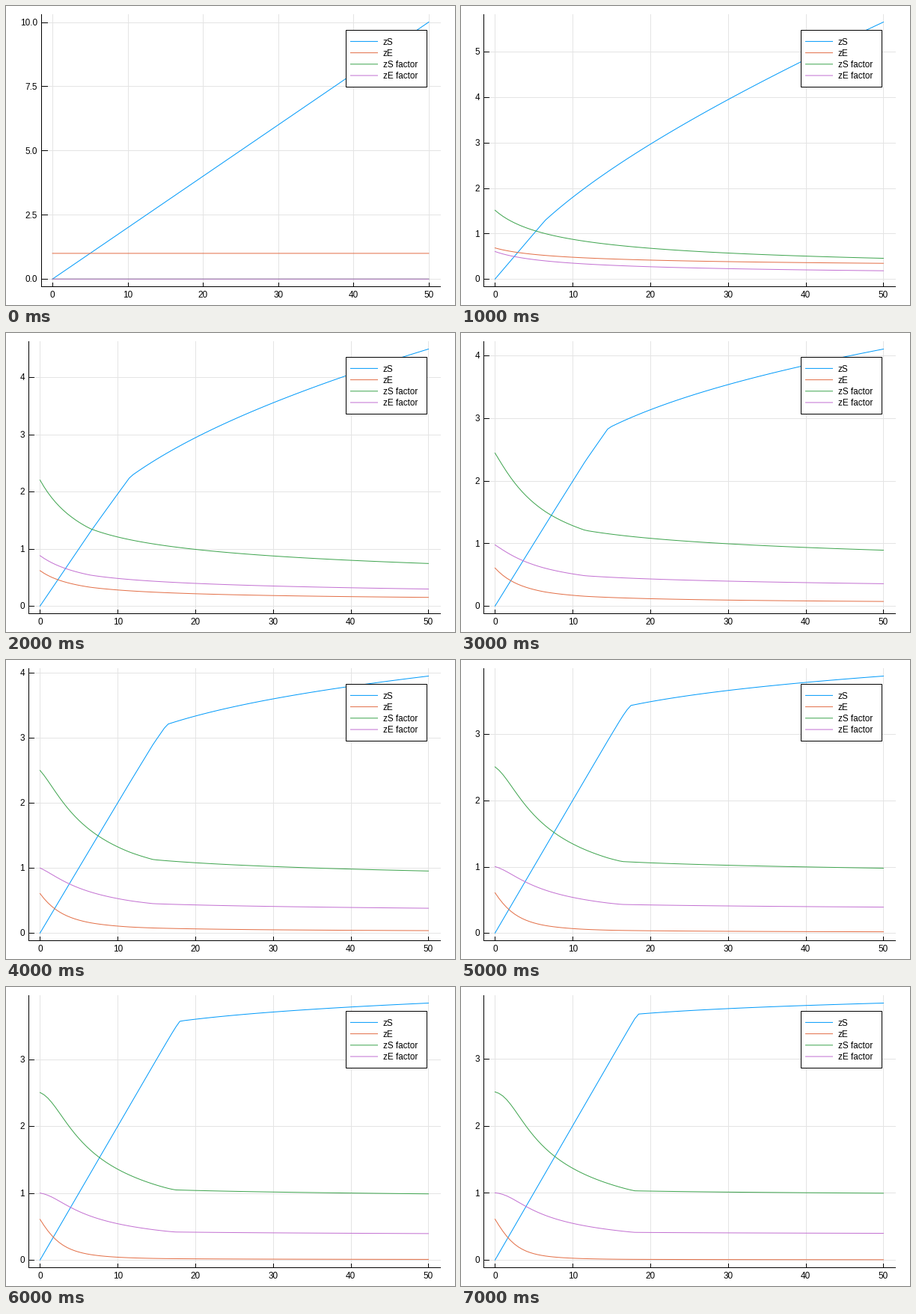
A matplotlib script for the animation above (8 s loop, 600 by 400 pixels).

```python
import numpy as np
import matplotlib.pyplot as plt
from matplotlib.animation import FuncAnimation
from matplotlib.patches import Rectangle

W, H, DPI = 600, 400, 100
PX = 72 / DPI
STEPS = 8
TOP, BOTTOM, RIGHT = 11.2, 375.6, 580
AXIS_Y = 375
PAD = 0.03 / 1.06
NAMES = ["zS", "zE", "zS factor", "zE factor"]
COLORS = ["#009afa", "#e36f47", "#3ea44e", "#c371d2"]

x = np.linspace(0, 50, 101)


def solve():
    """Damped iteration of both rates; returns the four curves per step."""
    cap = 0.2 * x
    s, e = cap.copy(), np.ones_like(x)
    states = [(s, e, 0 * x, 0 * x)]
    for k in range(STEPS - 1):
        crowding = 0.6 + 0.4 * 0.224 ** k
        ge = 0.605 / np.sqrt(crowding * (s + e))
        gs = 2.5 * ge
        s = 0.2 * s + 0.8 * np.minimum(cap, s * gs)
        e = 0.2 * e + 0.8 * np.minimum(1, e * ge)
        states.append((s, e, gs, ge))
    return states


states = solve()

fig = plt.figure(figsize=(W / DPI, H / DPI), dpi=DPI, facecolor="white")
ax = fig.add_axes([0, 0, 1, 1])


def line(xs, ys, color="black", z=2, **kw):
    ax.plot(xs, ys, color=color, lw=PX, zorder=z, **kw)


def label(px, py, text, ha):
    ax.text(px, py, text, ha=ha, va="baseline", zorder=6,
            family="Liberation Sans", fontsize=11.8 * PX)


def legend():
    ax.add_patch(Rectangle((454, 32), 108, 76, fc="white", ec="black",
                           lw=PX, zorder=4))
    for i, (name, color) in enumerate(zip(NAMES, COLORS)):
        y = 47.4 + 15.2 * i
        line([460.5, 496.5], [y, y], color, z=5, snap=False)
        label(503.5, y + 4.4, name, "left")


def draw(n):
    ax.clear()
    ax.set_xlim(0, W)
    ax.set_ylim(H, 0)
    ax.axis("off")

    curves = states[n]
    left = 47 if n == 0 else 29.9
    peak = max(c.max() for c in curves)
    x_pad, y_pad = PAD * (RIGHT - left), PAD * (BOTTOM - TOP)

    def to_x(v):
        return left + x_pad + v / 50 * (RIGHT - left - 2 * x_pad)

    def to_y(v):
        return BOTTOM - y_pad - v / peak * (BOTTOM - TOP - 2 * y_pad)

    for v in range(0, 51, 10):
        px = to_x(v)
        line([px, px], [TOP, AXIS_Y], "#e4e4e4", z=1)
        line([px, px], [AXIS_Y - 5, AXIS_Y])
        label(px, 390, str(v), "center")

    # ticks may also fall in the padding above the peak
    step = 2.5 if n == 0 else 1
    for v in np.arange(0, peak * 1.03, step):
        py = to_y(v)
        line([left, RIGHT], [py, py], "#e4e4e4", z=1)
        line([left, left + 7.5], [py, py])
        label(left - 5, py + 4.2, f"{v:.1f}" if n == 0 else f"{v:.0f}", "right")

    line([left, left], [TOP, AXIS_Y])
    line([left, RIGHT], [AXIS_Y, AXIS_Y])
    for c, color in zip(curves, COLORS):
        line(to_x(x), to_y(c), color, z=3, snap=False)
    legend()
    return []


anim = FuncAnimation(fig, draw, frames=STEPS, interval=1000, repeat=True,
                     repeat_delay=0, init_func=lambda: draw(0))
plt.show()
```
